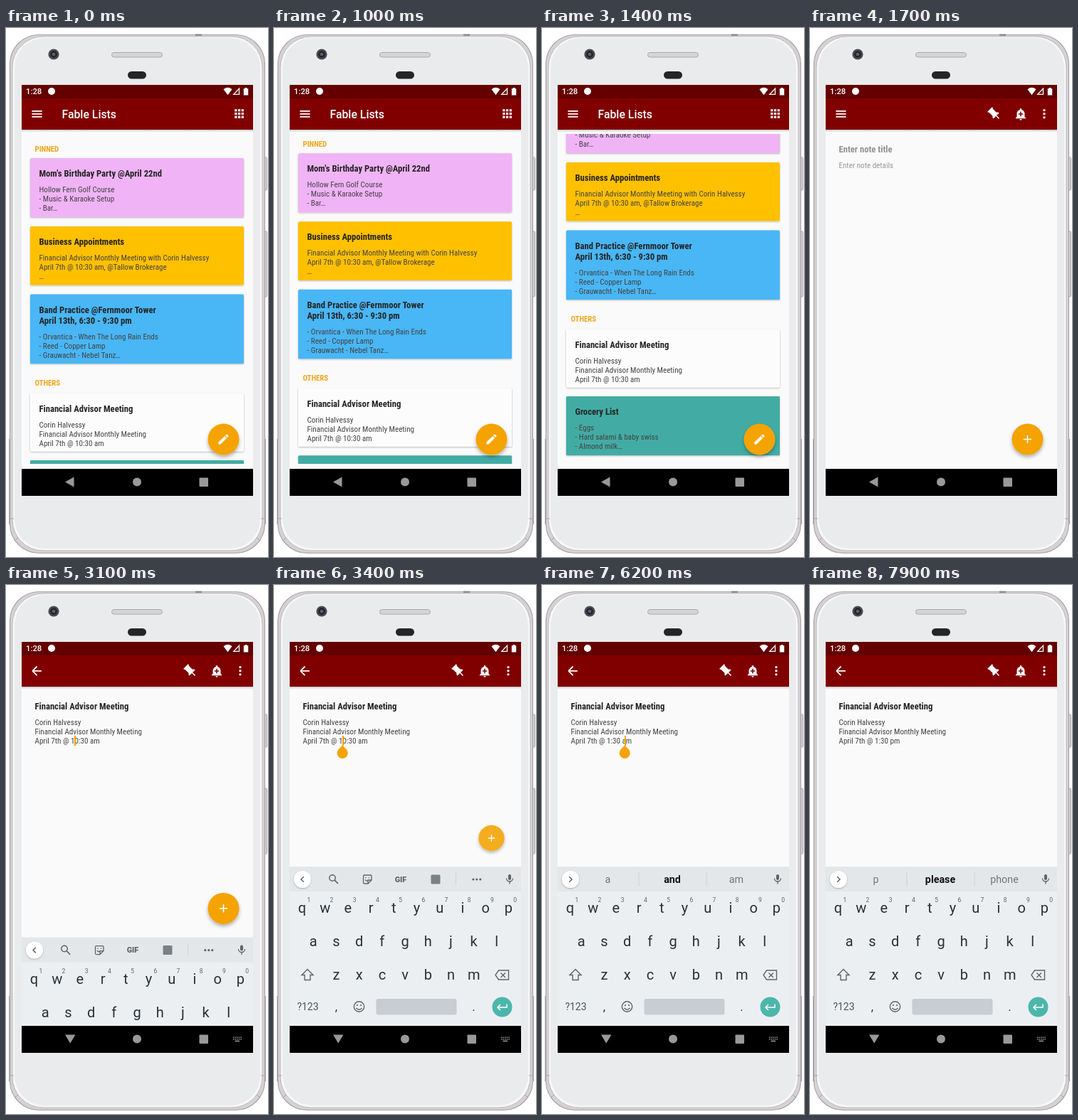
Recreate the animation shown at these times as an HTML page. Size 368 px wide and 744 px high, loop 8 s.

```html
<!DOCTYPE html>
<html lang="en">
<head>
<meta charset="utf-8">
<title>Notes on a phone</title>
<style>
  html, body { margin: 0; width: 100%; height: 100%; overflow: hidden; background: #fff; }
  svg { display: block; width: 368px; height: 744px; }
  text { font-family: Roboto, sans-serif; white-space: pre; }
  .narrow { font-family: "Roboto Condensed", Roboto, sans-serif; font-stretch: 75%; }
</style>
</head>
<body>
<svg id="stage" viewBox="0 0 368 744" xmlns="http://www.w3.org/2000/svg"></svg>
<script>
const LOOP = 8000, STEP = 100, DP = 0.79;
const ORANGE = '#f4a300', KEY = '#263238', ICON = '#5f6368', INK = '#242424', SOFT = '#434343';

// Uses the condensed face if there is one, otherwise narrows the regular face
const pen = document.createElement('canvas').getContext('2d');
const measure = font => { pen.font = font; return pen.measureText('Meeting Advisor').width; };
const hasNarrow = measure('condensed 40px "Roboto Condensed", Roboto, sans-serif') <
  measure('40px Roboto, sans-serif') * 0.95;
const squeeze = hasNarrow ? 1 : 0.885;

const narrow = (x, y, str, size = 11.07, weight = 400, fill = SOFT, more = '') =>
  `<text class="narrow" transform="translate(${x} ${y}) scale(${squeeze} 1)" font-size="${size}" font-weight="${weight}" fill="${fill}" ${more}>${str}</text>`;
const text = (x, y, str, size, fill, weight = 400, anchor = 'middle') =>
  `<text x="${x}" y="${y}" font-size="${size}" font-weight="${weight}" fill="${fill}" text-anchor="${anchor}">${str}</text>`;
const rect = (x, y, w, h, fill, more = '') =>
  `<rect x="${x}" y="${y}" width="${w}" height="${h}" fill="${fill}" ${more}/>`;
const circle = (x, y, r, fill, more = '') =>
  `<circle cx="${x}" cy="${y}" r="${r}" fill="${fill}" ${more}/>`;
const line = (d, stroke, width, more = '') =>
  `<path d="${d}" fill="none" stroke="${stroke}" stroke-width="${width}" ${more}/>`;
const group = (id, body, more = '') => `<g id="${id}" ${more}>${body}</g>`;
// 24-unit icon centred on a point
const icon = (x, y, d, fill, scale = DP, turn = 0) =>
  `<path transform="translate(${x} ${y}) rotate(${turn}) scale(${scale}) translate(-12 -12)" d="${d}" fill="${fill}"/>`;

const defs = `<defs>
  <clipPath id="screen"><rect x="22" y="80" width="325" height="578"/></clipPath>
  <clipPath id="view"><rect x="22" y="149" width="325" height="464"/></clipPath>
  <clipPath id="body"><rect x="22" y="143" width="325" height="477"/></clipPath>
  <filter id="low" x="-10%" y="-10%" width="120%" height="125%"><feDropShadow dx="0" dy="1" stdDeviation="1" flood-opacity=".28"/></filter>
  <filter id="high" x="-40%" y="-40%" width="180%" height="190%"><feDropShadow dx="0" dy="3" stdDeviation="2.6" flood-opacity=".3"/></filter>
  <linearGradient id="shade" x2="0" y2="1"><stop stop-opacity=".2"/><stop offset="1" stop-opacity="0"/></linearGradient>
</defs>`;

function phone() {
  const edge = '#a8a4a8', metal = '#d5d2d5';
  return rect(361, 182, 5.5, 46, metal, `rx="1.5" stroke="${edge}"`) +
    rect(361, 286, 5.5, 92, metal, `rx="1.5" stroke="${edge}"`) +
    rect(5.5, 9.5, 358, 729, metal, `rx="41" stroke="${edge}" stroke-width="1.2"`) +
    rect(9, 12, 351, 723, '#f7f7f8', 'rx="43" stroke="#bdb9bd"') +
    rect(12, 14, 345, 718, '#e9ebec', 'rx="42"') +
    line('M4.5 578V698M364.5 578V698', edge, 1) +
    line('M5 690H11M358 690H364M12 721L17 717M357 721L352 717', edge, 1) +
    rect(266, 8.5, 9, 2.5, '#8d8b8d') +
    circle(67, 37, 7.6, '#4b4c50') + circle(67, 37, 5, '#25272c') + circle(67, 37, 2.3, '#53627a') +
    rect(148.5, 34.5, 71, 6.5, '#d5d5d6', 'rx="3.2" stroke="#aaa9aa"') +
    rect(171, 61, 26, 10.5, '#242527', 'rx="5.2"');
}

function statusBar() {
  return rect(22, 80, 325, 19, '#640000') +
    text(28, 93.4, '1:28', 11.3, '#fff', 500, 'start') +
    circle(64, 89, 5, '#fff') +
    '<path d="M305.5 86.2Q311.5 81.4 317.5 86.2L311.5 94.2Z" fill="#fff"/>' +
    line('M319.8 93.4H327.5V85.2Z', '#fff', 1.3) +
    '<path d="M333.8 85.3H335.6V84H338.4V85.3H340.2V94.5H333.8Z" fill="#fff"/>';
}

function appBar() {
  let grid = '';
  for (let i = 0; i < 9; i++)
    grid += rect(321.2 + i % 3 * 4.74, 114.2 + Math.floor(i / 3) * 4.74, 3.2, 3.2, '#fff');
  const pin = 'M16 12V4H17V2H7V4H8V12L6 14V16H11.2V22H12.8V16H18V14Z';
  const bell = 'M10 21a2 2 0 0 0 4 0zM18.9 16.8V11c0-3.2-2.3-6-5.3-6.7v-.7a1.6 1.6 0 0 0-3.2 0v.7C7.4 5 5.1 7.8 5.1 11v5.8L3 18.9V20h18v-1.1zM16 13h-3v3h-2v-3H8V11h3V8h2v3h3z';
  return rect(22, 143, 325, 3.5, 'url(#shade)') + rect(22, 99, 325, 44, '#800000') +
    group('nav', line('', '#fff', 1.8, 'id="bars"')) +
    group('listBar', text(78.5, 126.5, 'Fable Lists', 15.8, '#fff', 500, 'start') + grid) +
    group('noteBar', icon(259, 121, pin, '#fff', 0.92, -45) + icon(296, 121, bell, '#fff') +
      [115.6, 120.7, 125.8].map(y => circle(329, y, 1.65, '#fff')).join(''));
}

const cards = [
  [183, 83, '#f0b3f6', ["Mom's Birthday Party @April 22nd"],
    ['Hollow Fern Golf Course', '- Music &amp; Karaoke Setup', '- Bar…']],
  [279, 82.5, '#ffc000', ['Business Appointments'],
    ['Financial Advisor Monthly Meeting with Corin Halvessy', 'April 7th @ 10:30 am, @Tallow Brokerage', '…']],
  [374.5, 97.5, '#49b6f5', ['Band Practice @Fernmoor Tower', 'April 13th, 6:30 - 9:30 pm'],
    ['- Orvantica - When The Long Rain Ends', '- Reed - Copper Lamp', '- Grauwacht - Nebel Tanz…']],
  [513.5, 82, '#fcfcfc', ['Financial Advisor Meeting'],
    ['Corin Halvessy', 'Financial Advisor Monthly Meeting', 'April 7th @ 10:30 am']],
  [608, 83, '#43aca4', ['Grocery List'],
    ['- Eggs', '- Hard salami &amp; baby swiss', '- Almond milk…']]
];

function card([y, h, fill, heads, lines]) {
  const top = y + 26, next = top + 22 + (heads.length - 1) * 15;
  return rect(34, y, 300, h, fill, 'rx="1.5" filter="url(#low)"') +
    heads.map((s, i) => narrow(46.5, top + i * 15, s, 12.65, 700, INK)).join('') +
    lines.map((s, i) => narrow(46.5, next + i * 13, s)).join('');
}

function list() {
  const label = (y, s) => narrow(40.5, y, s, 10.8, 700, '#f2a51d');
  return group('list', `<g id="rows">${label(173.5, 'PINNED')}${label(503, 'OTHERS')}${cards.map(card).join('')}</g>`,
    'clip-path="url(#view)"');
}

function note() {
  return group('note',
    group('hint', narrow(40.5, 175.3, 'Enter note title', 12.65, 700, '#929292') +
      narrow(40.5, 197, 'Enter note details', 11.07, 400, '#979797')) +
    group('filled', narrow(40.5, 175.3, 'Financial Advisor Meeting', 12.65, 700, INK) +
      narrow(40.5, 197, 'Corin Halvessy') +
      narrow(40.5, 210, 'Financial Advisor Monthly Meeting') +
      narrow(40.5, 223, '', 11.07, 400, SOFT, 'id="when"')) +
    rect(-1, 212, 2, 14, ORANGE, 'id="caret"') +
    `<path id="handle" d="M0 225.500L5.4 231A7.6 7.6 0 1 1 -5.4 231Z" fill="${ORANGE}"/>`);
}

function fab() {
  const pencil = 'M3 17.2V21h3.8L17.8 9.9 14.1 6.2zM20.7 7a1 1 0 0 0 0-1.4L18.4 3.3a1 1 0 0 0-1.4 0L15.1 5.1 18.9 8.9z';
  return group('fab', circle(0, 0, 22, ORANGE, 'filter="url(#high)"') +
    group('pencil', icon(0, 0, pencil, '#fff')) +
    group('plus', line('M-5.6 0H5.6M0 -5.6V5.6', '#fff', 1.6)));
}

function keyboard() {
  const row = (keys, x, y) => [...keys].map((k, i) => text(x + i * 32.2, y, k, 20, KEY)).join('');
  const digits = [...'1234567890'].map((d, i) => text(48.8 + i * 32.2, 446, d, 8.5, ICON)).join('');
  const tools =
    circle(82, 412, 4.2, 'none', `stroke="${ICON}" stroke-width="1.5"`) + line('M85.2 415.2L90 420', ICON, 1.7) +
    line('M127 408H135.5Q137 408 137 409.5V415L132 420H127Q125.5 420 125.5 418.5V409.5Q125.5 408 127 408ZM132 420V415H137M128 414.5Q129.5 417 132 415.5', ICON, 1.3) +
    circle(129, 411.7, 0.8, ICON) + circle(133.5, 411.7, 0.8, ICON) +
    text(178, 417.7, 'GIF', 10.8, ICON, 900) +
    rect(220.5, 407.5, 13, 13, '#7b8085', 'rx="1.5"') +
    rect(255, 405, 1, 17, '#cfd3d6') +
    [279.8, 284.8, 289.8].map(x => circle(x, 414, 1.6, ICON)).join('');
  const words = rect(135.5, 404, 1, 20, '#cfd3d6') + rect(230.5, 404, 1, 20, '#cfd3d6') +
    [92.5, 183, 273].map((x, i) => text(x, 419.3, '', 14.3, i == 1 ? '#111' : '#71767a', i == 1 ? 700 : 400)).join('');
  return group('keys',
    rect(22, 396, 325, 224, '#eceff1') + rect(22, 396, 325, 35, '#e4e7ea') +
    circle(40, 414, 12, '#fff', 'filter="url(#low)"') +
    line('M1.8 -3.8L-2 0L1.8 3.8', ICON, 1.5, 'id="chevron"') +
    group('tools', tools) + group('words', words) +
    rect(329, 407, 4, 8, ICON, 'rx="2"') + line('M326.5 412.5a4.5 4.5 0 0 0 9 0M331 417V420.5', ICON, 1.3) +
    row('qwertyuiop', 39.5, 461) + digits + row('asdfghjkl', 55.2, 508) + row('zxcvbnm', 87.5, 554.5) +
    line('M47 540.5L55 548.5H51V555.5H43V548.5H39Z', ICON, 1.4) +
    line('M315.5 542H329.5V555H315.5L311 548.5ZM318.5 545.5L325 552M325 545.5L318.5 552', ICON, 1.4) +
    text(47.5, 598, '?123', 14, '#4c565b') + text(87.5, 599, ',', 17, KEY) + text(280.5, 599, '.', 17, KEY) +
    circle(119.5, 593, 7.2, 'none', `stroke="${ICON}" stroke-width="1.4"`) +
    circle(117, 591, 1.1, ICON) + circle(122, 591, 1.1, ICON) + line('M115.5 595Q119.5 599.5 123.5 595', ICON, 1.4) +
    rect(143.5, 582, 113, 22.5, '#c8ccd3', 'rx="3"') +
    circle(320.5, 593.5, 14, '#4db6ac') +
    line('M327 589.5V594H314.5M318 590L314 594L318 598', '#fff', 1.5));
}

function navBar() {
  let dots = '';
  for (let i = 0; i < 10; i++)
    dots += rect(319 + i % 5 * 2.6, 635.5 + Math.floor(i / 5) * 2.6, 1.5, 1.5, '#999');
  return rect(22, 620, 325, 38, '#000') +
    '<path id="backUp" d="M83 638.5L95.5 631.5V645.5Z" fill="#999"/>' +
    '<path id="backDown" d="M83 632.5H97.5L90.2 644.5Z" fill="#999"/>' +
    circle(184, 638.5, 6, '#999') + rect(271.5, 632.5, 12.5, 12.5, '#999', 'rx="1"') +
    group('imeDots', dots + rect(321.5, 640.7, 6.5, 1.5, '#999'));
}

const stage = document.getElementById('stage');
stage.innerHTML = defs + rect(0, 0, 368, 744, '#fff') + phone() +
  `<g clip-path="url(#screen)">${rect(22, 80, 325, 578, '#fafafa')}${list()}${note()}` +
  `<g clip-path="url(#body)">${fab()}${keyboard()}</g>${appBar()}${statusBar()}${navBar()}</g>`;

const el = {};
stage.querySelectorAll('[id]').forEach(e => el[e.id] = e);
const wordEls = el.words.querySelectorAll('text');

const clamp = v => Math.max(0, Math.min(1, v));
const part = (t, a, b) => clamp((t - a) / (b - a));
const mix = (a, b, p) => a + (b - a) * p;
const show = (e, on) => e.setAttribute('visibility', on ? 'inherit' : 'hidden');
const move = (e, x, y, more = '') => e.setAttribute('transform', `translate(${x} ${y}) ${more}`);
// Last entry whose start time has been reached
const at = (track, t) => track.filter(k => k[0] <= t).pop();

const scrolls = [[0, 0], [1000, 6.7], [1100, 38], [1200, 76], [1300, 86], [1400, 90], [1500, 92]];
const times = [[0, '10:30 am'], [4600, '1:30 am'], [6900, '1:30 m'], [7300, '1:30 pm']];
// start, caret x, handle shown
const carets = [[0, 97, false], [3200, 97, true], [4500, 102, true], [4600, 97, true], [4700, 97, false],
  [5900, 117, true], [6900, 112, false], [7300, 117, false]];
const blinks = [[0, 0], [3100, 1], [3600, 0], [4100, 1], [5200, 0], [5700, 1], [6600, 0], [6900, 1], [7900, 0]];
const hints = [[0, 'a', 'and', 'am'], [7000, 'and', 'the', 'is'], [7400, 'p', 'please', 'phone']];

function drawNav(p) {
  const a = mix(-7.1, 0, p), b = mix(7.1, 6.3, p), y1 = mix(4, 6.3, p), y2 = mix(4, 0, p);
  el.bars.setAttribute('d', `M${a} ${-y1}L${b} ${-y2}M${a} ${y1}L${b} ${y2}M${mix(-7.1, -6.3, p)} 0H${mix(7.1, 5.8, p)}`);
  move(el.nav, 43.5, 120.8, `rotate(${180 * p})`);
}

function draw(ms) {
  const t = Math.floor(ms / STEP) * STEP;
  const inNote = t >= 1700, typing = t >= 3100;

  show(el.list, !inNote);
  show(el.listBar, !inNote);
  show(el.pencil, !inNote);
  show(el.note, inNote);
  show(el.noteBar, inNote);
  show(el.plus, inNote);
  move(el.rows, 0, -at(scrolls, t)[1]);
  drawNav(part(t, 1700, 2000));

  show(el.hint, inNote && t < 1800);
  show(el.filled, t >= 1800);
  el.when.textContent = 'April 7th @ ' + at(times, t)[1];
  const [, x, held] = at(carets, t);
  move(el.caret, x, 0);
  move(el.handle, x - 0.8, 0);
  show(el.caret, at(blinks, t)[1] === 1);
  show(el.handle, held);

  const rise = 1 - (1 - part(t, 3000, 3300)) ** 2;
  move(el.keys, 0, 224 * (1 - rise));
  show(el.keys, typing);

  // The button shrinks and fades once the keyboard is up
  const gone = part(t, 3300, 3540) ** 2;
  move(el.fab, 305.5, 578.5 - 222.5 * rise, `scale(${1 - gone})`);
  el.fab.setAttribute('opacity', 1 - 0.7 * gone);
  show(el.fab, gone < 1);

  const swap = part(t, 5800, 6200);
  el.tools.setAttribute('opacity', 1 - swap);
  el.words.setAttribute('opacity', swap);
  move(el.chevron, 40, 414, `rotate(${180 * swap})`);
  const words = at(hints, t);
  wordEls.forEach((w, i) => w.textContent = words[i + 1]);

  show(el.backUp, !typing);
  show(el.backDown, typing);
  show(el.imeDots, typing);
}

const start = performance.now();
function tick() {
  draw((performance.now() - start) % LOOP);
  requestAnimationFrame(tick);
}
tick();
</script>
</body>
</html>
```
